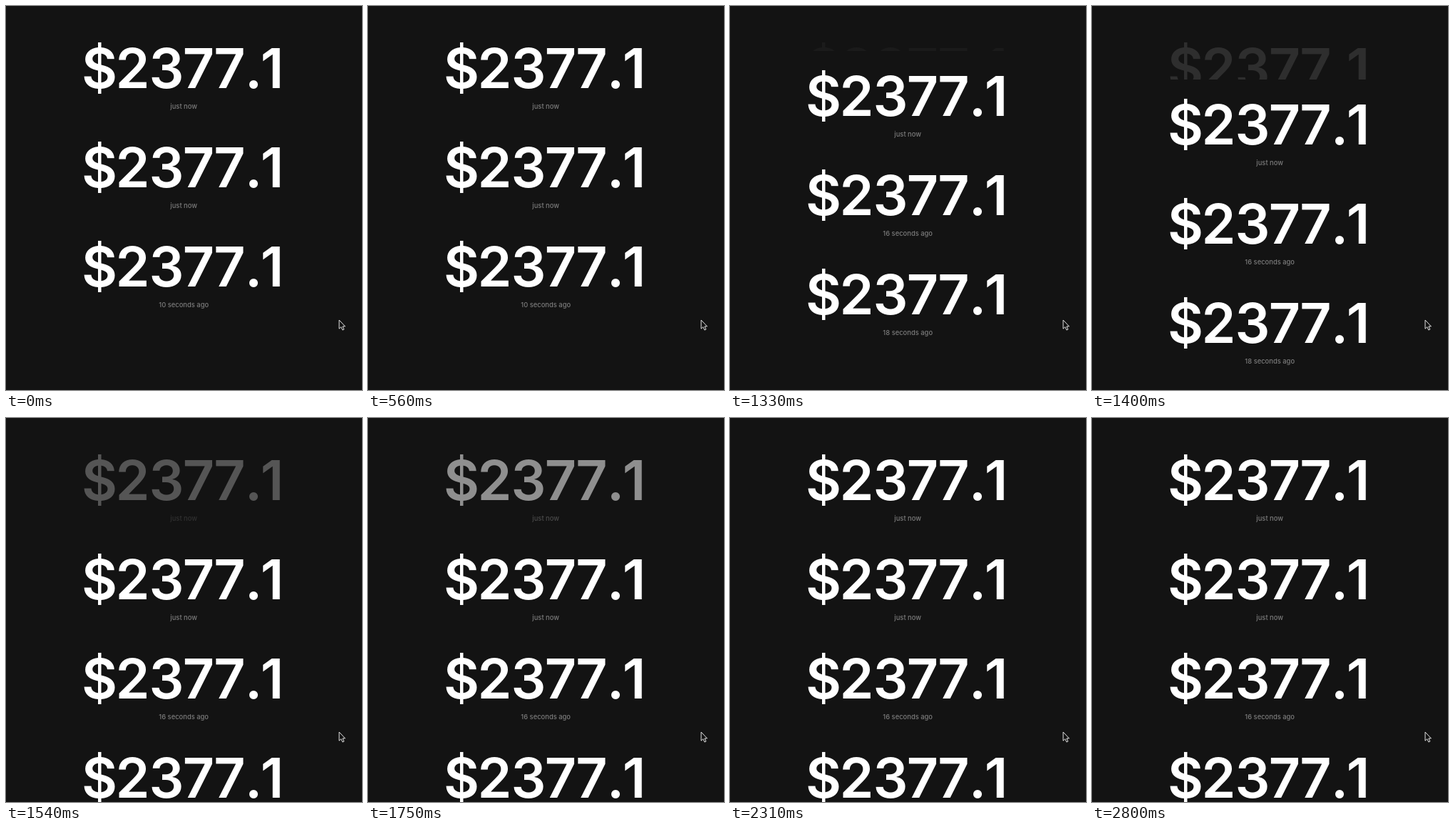
These frames come from a looping animation (499x538 px, 2.87 s). An HTML page:

```html
<!DOCTYPE html>
<html lang="en">
<head>
<meta charset="utf-8">
<title>Price feed</title>
<style>
  html, body { margin: 0; width: 100%; height: 100%; overflow: hidden; background: #131313; }
  svg { display: block; width: 499px; height: 538px; font-family: Inter, sans-serif; text-anchor: middle; }
  .price { font-size: 77px; font-weight: 580; fill: #fff; }
  .age { font-size: 9.4px; font-weight: 500; fill: #7c7c7c; }
</style>
</head>
<body>
<svg viewBox="0 0 499 538">
  <defs>
    <!-- one centre per glyph -->
    <text id="price" class="price" y="114.5" x="131 177.5 225 270 313.5 347 373">$2377.1</text>
    <clipPath id="slot"><rect id="slotBox" x="0" y="24" width="499" height="0"/></clipPath>
  </defs>

  <g clip-path="url(#slot)">
    <g id="fresh" opacity="0">
      <use href="#price"/>
      <text class="age" x="249.2" y="144">just now</text>
    </g>
  </g>

  <g id="list">
    <g>
      <use href="#price"/>
      <text class="age" x="249.2" y="144">just now</text>
    </g>
    <g transform="translate(0 139)">
      <use href="#price"/>
      <text id="second" class="age" x="249.2" y="144">just now</text>
    </g>
    <g transform="translate(0 278)">
      <use href="#price"/>
      <text id="third" class="age" x="249.2" y="144">10 seconds ago</text>
    </g>
  </g>

  <path d="M467 440V452.2L469.8 449.7L471.8 454L473.8 453.1L471.9 448.9H475.4Z"
        fill="#111" stroke="#e4e4e4" stroke-width="1" stroke-linejoin="round"/>
</svg>
<script>
  const LOOP = 2870, TICK = 70;
  const MOUNT = 1120, GROW = 1288, GROW_TIME = 240, FADE = 1305, FADE_TIME = 850;
  const PADDING = 32, ROW = 139;

  const $ = id => document.getElementById(id);
  const list = $('list'), fresh = $('fresh'), slotBox = $('slotBox');
  const second = $('second'), third = $('third');

  const progress = (t, start, time) => Math.min(1, Math.max(0, (t - start) / time));
  const ease = p => p < 0.5 ? 2 * p * p : 1 - 2 * (1 - p) * (1 - p);

  function draw(t) {
    const mounted = t >= MOUNT;
    // a new row starts as bare padding, then its content opens
    const height = mounted
      ? Math.round(PADDING + (ROW - PADDING) * ease(progress(t, GROW, GROW_TIME)))
      : 0;
    list.setAttribute('transform', `translate(0 ${height})`);
    slotBox.setAttribute('height', height);
    fresh.setAttribute('opacity', progress(t, FADE, FADE_TIME));
    second.textContent = mounted ? '16 seconds ago' : 'just now';
    third.textContent = mounted ? '18 seconds ago' : '10 seconds ago';
  }

  const begin = performance.now();
  function frame() {
    const t = (performance.now() - begin) % LOOP;
    draw(Math.floor(t / TICK) * TICK);
    requestAnimationFrame(frame);
  }
  frame();
</script>
</body>
</html>
```
